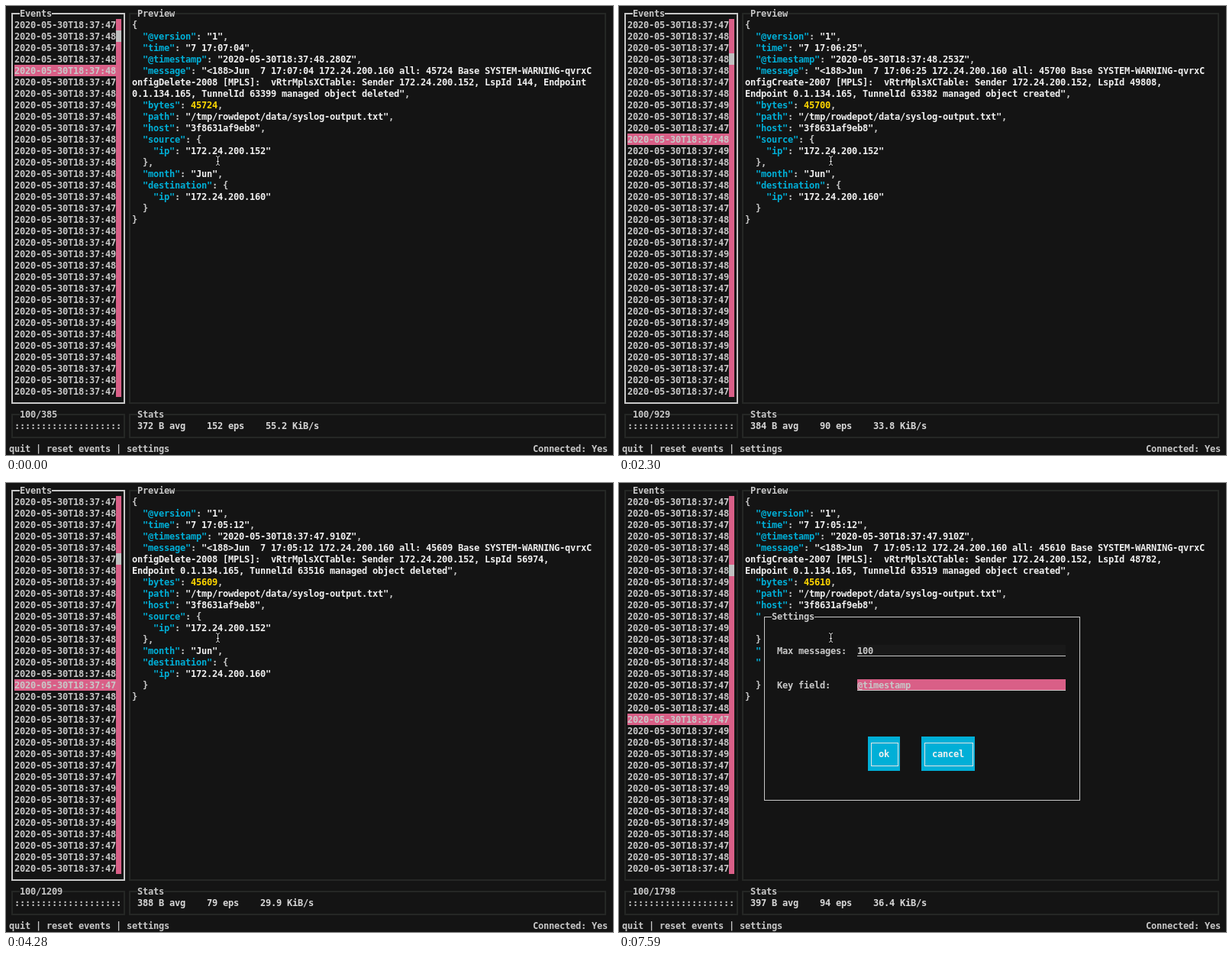
Recreate the animation shown at these times as an HTML page with a canvas. Size 795 px wide and 588 px high, loop 8000 ms.

```html
<!DOCTYPE html>
<html lang="en">
<head>
<meta charset="utf-8">
<title>Event viewer</title>
<style>
html, body { margin: 0; width: 795px; height: 588px; overflow: hidden; background: #141414; }
canvas { display: block; }
</style>
</head>
<body>
<canvas id="screen" width="795" height="588"></canvas>
<script>
const ctx = document.getElementById('screen').getContext('2d');
const LOOP = 8000, CELL_W = 7, CELL_H = 15;
const BG = '#141414', GREY = '#c8c8c8', WHITE = '#f0f0f0', DIM = '#252725';
const PINK = '#d95f87', CYAN = '#00afd7', YELLOW = '#ffd700';
const SECONDS = '787887898789888878879897799898787';

// Start time, average bytes, events per second
const stats = [
  [0, 372, 152], [170, 378, 100], [650, 383, 107], [1220, 383, 124], [1670, 384, 123],
  [2120, 384, 90], [2660, 385, 57], [3140, 386, 72], [3770, 387, 72], [4280, 388, 79],
  [4780, 391, 148], [5280, 395, 103], [5820, 395, 81], [6300, 396, 81], [6840, 396, 82],
  [7590, 397, 94]
];
let total = 233;
for (const s of stats) s.push(total += s[2]);

// Start time, clock, timestamp, bytes, sender, LSP (0: link message), tunnel, created
const events = [
  [0, '07:04', '48.280', 45724, 152, 144, 63399],
  [170, '06:24', '48.252', 45697, 152, 49804, 63375, 1],
  [380, '06:25', '48.252', 45698, 152, 16525, 63376, 1],
  [470, '06:26', '48.253', 45702, 152, 0],
  [830, '06:25', '48.252', 45699, 152, 16526, 63376],
  [1940, '06:24', '48.252', 45696, 152, 49807, 63381],
  [2300, '06:25', '48.253', 45700, 152, 49808, 63382, 1],
  [2660, '06:28', '48.254', 45703, 152, 0],
  [3020, '06:27', '48.253', 45701, 159, 61483, 63718, 1],
  [3320, '06:27', '48.254', 45704, 159, 61484, 63719],
  [3680, '06:29', '48.254', 45705, 152, 57344, 63522, 1],
  [3950, '06:31', '48.255', 45706, 152, 56974, 63515, 1],
  [4280, '05:12', '47.910', 45609, 152, 56974, 63516],
  [4370, '05:11', '47.909', 45607, 152, 48780, 63517, 1],
  [4900, '05:11', '47.909', 45608, 152, 48781, 63518],
  [5070, '05:12', '47.910', 45610, 152, 48782, 63519, 1]
];

const colX = c => 4 + c * CELL_W;
const rowY = r => 2 + r * CELL_H;
const lastIndex = (list, t) => list.filter(item => item[0] <= t).length - 1;

function fill(col, row, cols, rows, color) {
  ctx.fillStyle = color;
  ctx.fillRect(colX(col), rowY(row), cols * CELL_W, rows * CELL_H);
}

function write(text, col, row, color = GREY) {
  ctx.fillStyle = color;
  [...text].forEach((ch, i) => {
    if (ch !== ' ') ctx.fillText(ch, colX(col + i), rowY(row) + 12);
  });
}

// Border through the centres of the cells, with an optional title in its top edge
function box(c1, r1, c2, r2, color, width, title = '') {
  const inset = width === 1 ? 4.5 : 4;
  const x = colX(c1) + inset, y = rowY(r1) + inset + 4;
  ctx.strokeStyle = color;
  ctx.lineWidth = width;
  ctx.strokeRect(x, y, (c2 - c1) * CELL_W, (r2 - r1) * CELL_H);
  if (title) {
    fill(c1 + 2, r1, title.length, 1, BG);
    write(title, c1 + 2, r1);
  }
}

function message([, clock, , bytes, sender, lsp, tunnel, created]) {
  const head = `<188>Jun  7 17:${clock} 172.24.200.160 all: ${bytes} Base SYSTEM-WARNING-`;
  if (!lsp) return head + 'linkS\ntateChange-2004 [PORT]:  Link 1/1/4 operational state changed';
  const [verb, code] = created ? ['Create', 2007] : ['Delete', 2008];
  const endpoint = lsp < 1000 ? ' Endpoint\n' : '\nEndpoint ';
  return `${head}qvrxC\nonfig${verb}-${code} [MPLS]:  vRtrMplsXCTable: Sender 172.24.200.${sender}, ` +
    `LspId ${lsp},${endpoint}0.1.134.165, TunnelId ${tunnel} managed object ${verb.toLowerCase()}d`;
}

function preview(event) {
  const [, clock, stamp, bytes, sender] = event;
  const json = `{
  "@version": "1",
  "time": "7 17:${clock}",
  "@timestamp": "2020-05-30T18:37:${stamp}Z",
  "message": "${message(event)}",
  "bytes": ${bytes},
  "path": "/tmp/rowdepot/data/syslog-output.txt",
  "host": "3f8631af9eb8",
  "source": {
    "ip": "172.24.200.${sender}"
  },
  "month": "Jun",
  "destination": {
    "ip": "172.24.200.160"
  }
}`;
  let col = 23, row = 1;
  for (const [token, key, string, number] of json.matchAll(/("[^"]*"(?=:))|("[^"]*")|(\d+)|[^"\d]/g)) {
    const color = key ? CYAN : string ? WHITE : number ? YELLOW : GREY;
    token.split('\n').forEach((part, i) => {
      if (i) { col = 23; row++; }
      write(part, col, row, color);
      col += part.length;
    });
  }
}

function eventList(selected, focused) {
  box(0, 0, 21, 34, focused ? GREY : DIM, 2, 'Events');
  fill(1, selected, 19, 1, PINK);
  fill(20, 1, 1, 33, PINK);
  fill(20, Math.floor(selected * 0.33) + 1, 1, 1, '#c0c0c0');
  [...SECONDS].forEach((s, i) => write('2020-05-30T18:37:4' + s, 1, i + 1));
}

function field(label, value, row, focused) {
  write(label, 29, row);
  fill(44, row, 39, 1, focused ? PINK : '#191919');
  write(value, 44, row);
  ctx.fillStyle = GREY;
  ctx.fillRect(colX(44), rowY(row) + 14, 39 * CELL_W, 1);
}

function button(label, col) {
  const cols = label.length + 4;
  fill(col, 22, cols, 3, CYAN);
  box(col, 22, col + cols - 1, 24, '#e4e4e4', 1);
  write(label, col + 2, 23, WHITE);
}

function settings(t) {
  fill(26, 11, 60, 17, BG);
  box(26, 11, 85, 27, GREY, 1, 'Settings');
  field('Max messages:', '100', 14, t >= 6840 && t < 7590);
  field('Key field:', '@timestamp', 17, t >= 7590);
  button('ok', 46);
  button('cancel', 56);
}

function pointer() {
  const beam = new Path2D('M275 196.5Q277.5 196.5 277.5 199V206Q277.5 208.5 275 208.5' +
    'M280 196.5Q277.5 196.5 277.5 199M277.5 206Q277.5 208.5 280 208.5M276 203.5H279');
  for (const [color, width] of [['#000', 3], ['#e0e0e0', 1]]) {
    ctx.strokeStyle = color;
    ctx.lineWidth = width;
    ctx.stroke(beam);
  }
}

function draw(t) {
  const [, avg, eps, count] = stats[lastIndex(stats, t)];
  const current = lastIndex(events, t);
  const dialog = t >= 5820;
  ctx.font = 'bold 12px "DejaVu Sans Mono", monospace';
  ctx.fillStyle = BG;
  ctx.fillRect(0, 0, 795, 588);

  eventList(current + 5, !dialog);
  box(22, 0, 111, 34, DIM, 2, 'Preview');
  preview(events[current]);

  box(0, 35, 21, 37, DIM, 2, '100/' + count);
  write(':'.repeat(20), 1, 36);
  box(22, 35, 111, 37, DIM, 2, 'Stats');
  const rate = (avg * eps / 1024).toFixed(1);
  write(`${avg} B avg    ${eps} eps    ${rate} KiB/s`, 24, 36, '#d8d8d8');
  write('quit | reset events | settings', 0, 38);
  write('Connected: Yes', 98, 38);

  if (dialog) settings(t);
  pointer();
}

const start = performance.now();
function tick() {
  draw((performance.now() - start) % LOOP);
  requestAnimationFrame(tick);
}
tick();
</script>
</body>
</html>
```
